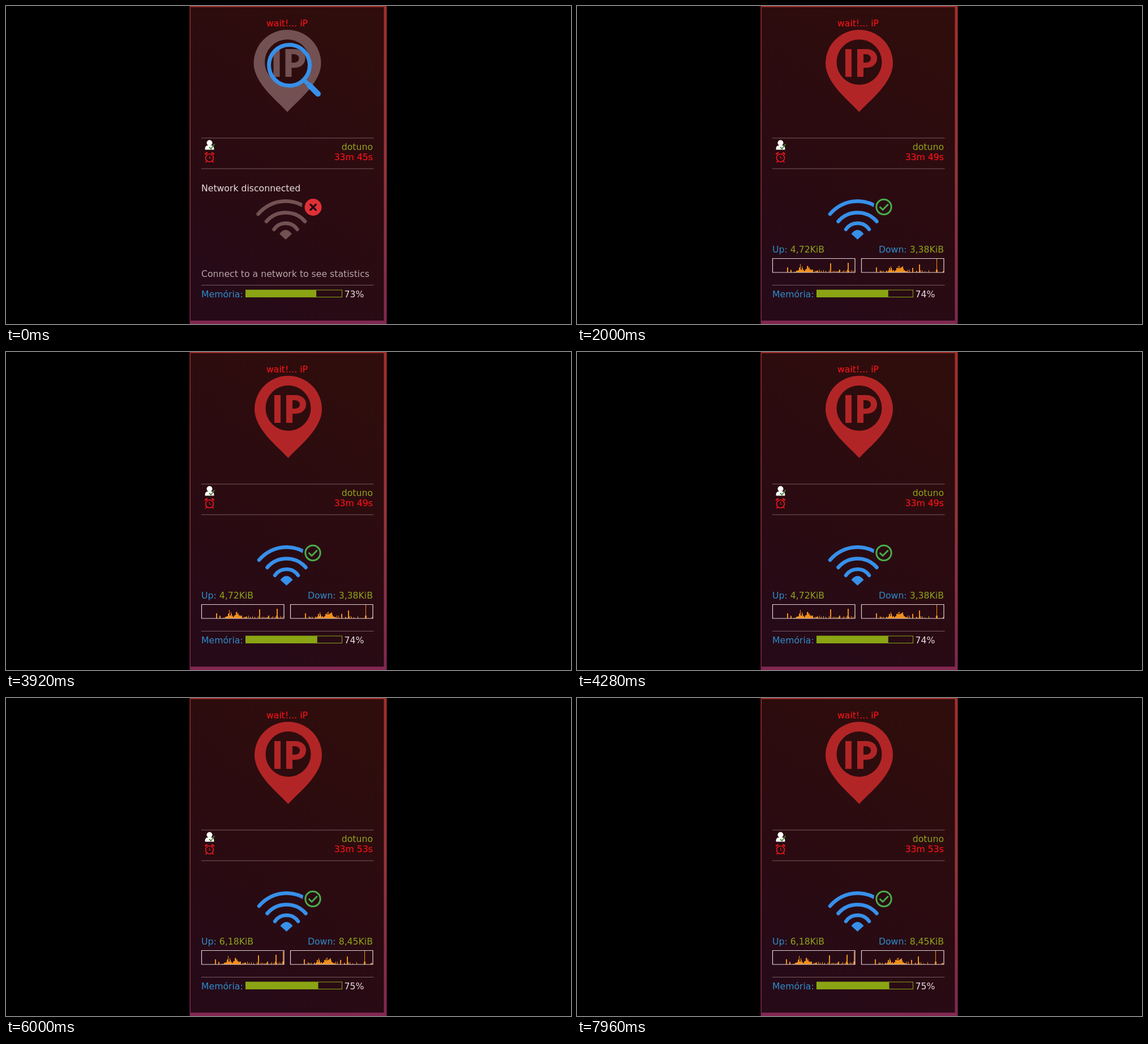
Write an HTML page that moves like this. It is 998x561 px and loops after 8000 ms.

```html
<!DOCTYPE html>
<html lang="en">
<head>
<meta charset="utf-8">
<title>System panel</title>
<style>
  html, body { margin: 0; width: 100%; height: 100%; overflow: hidden; background: #000; }
  svg { display: block; width: 998px; height: 561px; }
  text { font: 15.7px "DejaVu Sans", sans-serif; }
  .end { text-anchor: end; }
  .label { fill: #2e8cca; }
  .value { fill: #8fa31a; }
  .red { fill: #f01318; stroke: #f01318; stroke-width: .2; }
  .light { fill: #e9dcdf; }
  .line { fill: none; stroke-linecap: round; stroke-linejoin: round; }
</style>
</head>
<body>
<svg viewBox="0 0 998 561">
  <defs>
    <linearGradient id="edge" x2="0" y2="1">
      <stop offset="0" stop-color="#9f2f2b"/>
      <stop offset=".5" stop-color="#98343a"/>
      <stop offset="1" stop-color="#812751"/>
    </linearGradient>
    <linearGradient id="panel" x1=".7" x2=".3" y2="1">
      <stop offset="0" stop-color="#2f0d0c"/>
      <stop offset=".5" stop-color="#2b0b10"/>
      <stop offset="1" stop-color="#260a18"/>
    </linearGradient>
    <g id="pin">
      <path fill-rule="evenodd" d="M498.5 187C484 170 439 137 439 101A59.5 59 0 0 1 558 101C558 137 513 170 498.5 187ZM458.5 99a40 40 0 1 0 80 0a40 40 0 1 0-80 0Z"/>
      <path fill-rule="evenodd" d="M474 76h11v49h-11ZM495 76h16C537 76 536 109 511 109h-5v16h-11ZM506 85v15h4c12 0 12-15 0-15Z"/>
    </g>
    <g id="wifi">
      <g class="line" stroke-width="6.5">
        <path d="M447 367A63 63 0 0 1 544 367"/>
        <path d="M461.5 380A45 45 0 0 1 529.5 380"/>
        <path d="M475 394A25 25 0 0 1 516 394"/>
      </g>
      <path stroke="none" d="M484.5 402Q495.5 388 506.5 402L495.5 412Z"/>
      <circle cx="542" cy="355" r="18" fill="#2b0b11" stroke="none"/>
    </g>
  </defs>

  <rect x="324.5" width="348" height="561" fill="url(#edge)"/>
  <rect x="326" y="2" width="341.5" height="553" fill="url(#panel)"/>
  <path d="M345 233H649.5M345 287H649.5M345 492.5H649.5" stroke="#765a5e" stroke-width="1.2"/>

  <text x="460" y="36" class="red">wait!... iP</text>
  <text x="648" y="254" class="end value">dotuno</text>
  <text x="648" y="272" class="end red" id="uptime"></text>

  <g id="user">
    <path d="M351.5 253.500q-.5-7.500 5-7.500h6q5.500 0 5 7.500Z" fill="#fff"/>
    <circle cx="359.500" cy="241.500" r="5" fill="#fff"/>
    <path class="line" d="M359.500 249.500l2.500 2.500 6-8" stroke="#478a35" stroke-width="1.800"/>
  </g>
  <g id="alarm" class="line" stroke="#e8191d" stroke-width="1.700">
    <circle cx="359.500" cy="268" r="7"/>
    <path d="M359.500 264.500v4h2.500" stroke-width="1"/>
    <path d="M352 261l3-2M364 259l3 2" stroke-width="2.500"/>
    <path d="M354.500 273.500l-1.500 2M364.500 273.500l1.500 2"/>
  </g>

  <g id="offline">
    <use href="#pin" x="-1.500" fill="#735153"/>
    <circle cx="500.500" cy="104.500" r="36" fill="none" stroke="#3790e9" stroke-width="7"/>
    <path class="line" d="M528 132L538 142" stroke="#3790e9" stroke-width="7"/>
    <path class="line" d="M536 140L551 155" stroke="#3790e9" stroke-width="10"/>
    <text x="345" y="326.500" class="light">Network disconnected</text>
    <use href="#wifi" x="-1.500" fill="#735153" stroke="#735153"/>
    <circle cx="542.500" cy="355" r="15" fill="#e03037"/>
    <path class="line" d="M537.800 350.300l9.400 9.400m0-9.400l-9.400 9.400" stroke="#2b0b11" stroke-width="3.500"/>
    <text x="345" y="477.500" fill="#b9a3a8">Connect to a network to see statistics</text>
  </g>

  <g id="online">
    <use href="#pin" fill="#b22526"/>
    <use href="#wifi" fill="#3790e9" stroke="#3790e9"/>
    <g class="line" stroke="#49ad4b" stroke-width="3">
      <circle cx="542" cy="354.500" r="13.200"/>
      <path d="M535.500 355l4.500 4.500 9-9"/>
    </g>
    <text x="345" y="435" class="label">Up: <tspan class="value" id="up"></tspan></text>
    <text x="648" y="435" class="end label">Down: <tspan class="value" id="down"></tspan></text>
    <path id="upBars" fill="#ef8f18"/>
    <path id="downBars" fill="#ef8f18"/>
    <path d="M345.500 445.500h145.500v24.500h-145.500ZM502.500 445.500h145.500v24.500h-145.500Z" fill="none" stroke="#e5d5d8" stroke-width="1.200"/>
  </g>

  <text x="345" y="514" class="label">Memória:</text>
  <rect x="423.500" y="501" width="170" height="12.500" fill="none" stroke="#8aa414"/>
  <rect id="memory" x="423.500" y="501" height="12.500" fill="#8aa414"/>
  <text x="597.500" y="514" class="light" id="percent"></text>
</svg>
<script>
const LOOP = 8000;
const GRAPH_WIDTH = 145;
const steps = [
  { at: 0, mem: 73 },
  { at: 40, mem: 73 },
  { at: 2000, mem: 74, up: "4,72", down: "3,38" },
  { at: 4700, mem: 75, up: "10,2", down: "11,1" },
  { at: 6000, mem: 75, up: "6,18", down: "8,45" }
];
const firstOnline = steps.findIndex(step => step.up);

function seeded(seed) {
  return () => (seed = seed * 16807 % 2147483647) / 2147483647;
}

// Each burst has a centre, a spread and a height; wide ones are ragged.
function traffic(seed, bursts) {
  const random = seeded(seed);
  return Array.from({ length: GRAPH_WIDTH + 2 }, (_, x) => {
    const quiet = random() < .3 && x > 30 ? 1 + 4 * random() : 0;
    const ragged = .3 + .7 * random();
    const peaks = bursts.map(([centre, spread, height]) =>
      height * Math.exp(-(((x - centre) / spread) ** 2)) * (spread > 2 ? ragged : 1));
    return Math.round(Math.max(quiet, ...peaks));
  });
}

const upload = traffic(4711, [[25.5, .8, 14], [48, 6, 16], [63, 7, 14], [101.5, .7, 26], [132.5, .9, 23], [145, .8, 23]]);
const download = traffic(1931, [[25.5, .7, 15], [50, 3, 14], [68, 9, 14], [89.5, .7, 13], [101.5, .9, 19], [132, .8, 24]]);

const $ = id => document.getElementById(id);
const setText = (id, text) => { $(id).textContent = text; };

function drawBars(id, left, heights, shift) {
  $(id).setAttribute("d", heights
    .slice(shift, shift + GRAPH_WIDTH)
    .map((h, x) => `M${left + x} 470v${-h}h1v${h}Z`)
    .join(""));
}

function show(index) {
  const { mem, up, down } = steps[index];
  $("offline").style.display = up ? "none" : "";
  $("online").style.display = up ? "" : "none";
  setText("uptime", `33m ${45 + 2 * index}s`);
  setText("percent", `${mem}%`);
  $("memory").setAttribute("width", 170 * mem / 100 + .5);
  if (!up) return;
  const shift = index - firstOnline;
  setText("up", `${up}KiB`);
  setText("down", `${down}KiB`);
  drawBars("upBars", 346, upload, shift);
  drawBars("downBars", 503, download, shift);
}

let current;
function tick() {
  const t = performance.now() % LOOP;
  const index = steps.findLastIndex(step => step.at <= t);
  if (index !== current) show(current = index);
  requestAnimationFrame(tick);
}
tick();
</script>
</body>
</html>
```
